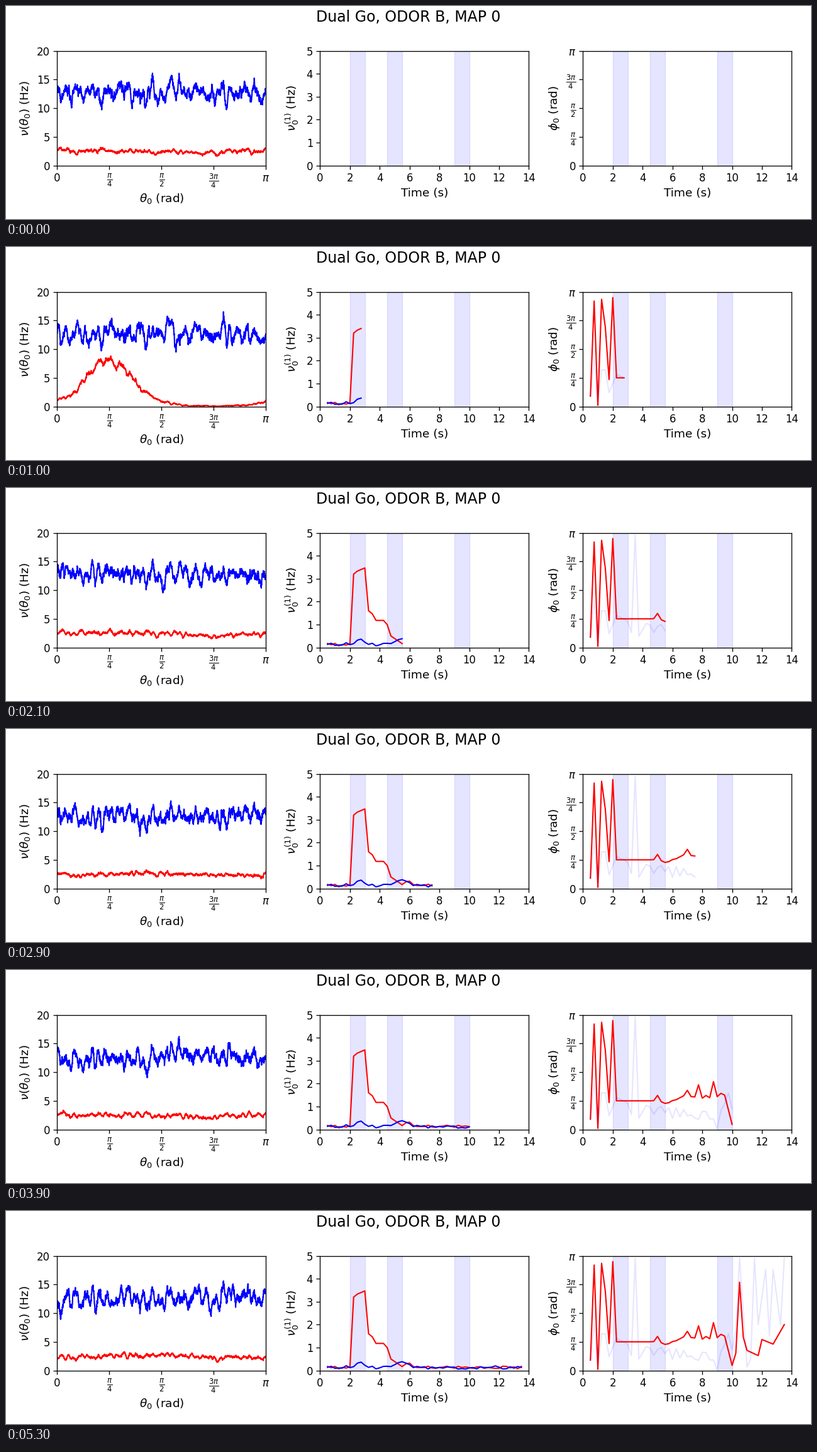
Recreate the animation shown at these times as a matplotlib script. Size 1280 by 340 pixels, loop 5400 ms.

```python
import numpy as np
import matplotlib.pyplot as plt
from matplotlib.animation import FuncAnimation

W, H, DPI = 1280, 340, 100
FRAMES, INTERVAL = 54, 100
TITLE, LABEL, TICK = 17.0, 13.3, 11.9
LINE = 1.5
RED_MEAN, BLUE_MEAN = 2.42, 12.6

plt.rcParams.update({
    "font.family": "DejaVu Sans",
    "axes.linewidth": 0.95,
    "xtick.labelsize": TICK, "ytick.labelsize": TICK,
    "xtick.major.size": 4.0, "ytick.major.size": 4.0,
    "xtick.major.width": 0.95, "ytick.major.width": 0.95,
    "xtick.major.pad": 4.1, "ytick.major.pad": 4.1,
})

t = 0.5 + 0.25 * np.arange(FRAMES - 1)
rng = np.random.default_rng(4)


def through(keys):
    """Straight segments through (time, value) key points."""
    return np.interp(t, *zip(*keys))


def jitter(scale):
    return scale * rng.uniform(-1, 1, t.size)


def swell(centre, width, height):
    return height * np.exp(-((t - centre) / width) ** 2)


# First Fourier moment: a noise floor plus the response to the cues
red_amp = through([(2, .12), (2.25, 3.2), (2.5, 3.33), (3, 3.47), (3.25, 1.6),
                   (3.5, 1.47), (3.75, 1.18), (4.25, 1.18), (4.5, 1),
                   (4.75, .5), (5.5, .17), (6, .3), (6.5, .13)])
red_amp += jitter(.06) * ((t < 2.25) | (t > 5.5))
blue_amp = (.13 + swell(2.75, .4, .17) + swell(5.5, .6, .25)
            + jitter(.08) * (1 - swell(5.2, .8, 1)))

# Phase as a fraction of pi: erratic, pinned by the cue, then drifting
drift = np.clip((t - 4.5) / 5, 0, 1)
delay = (t > 4.5) & (t < 9.5)
red_phase = through([(.5, .09), (.75, .92), (1, .01), (1.25, .935),
                     (1.5, .69), (1.75, .235), (2, .95), (2.25, .25),
                     (4.5, .25), (9.5, .30), (10, .044), (10.25, .15),
                     (10.5, .77), (10.75, .29), (11, .175), (11.75, .13),
                     (12, .27), (12.75, .23), (13.5, .40)])
red_phase += delay * (swell(5, .1, .045) + swell(7, .2, .06)
                      + swell(7.75, .1, .1) + swell(8.75, .1, .11)
                      - swell(5.6, .4, .035) + jitter(.02) * drift)
blue_phase = through([(.5, .09), (.75, .41), (1, .05), (1.25, .32),
                      (1.5, .32), (1.75, .12), (2.25, .28), (3, .23),
                      (3.25, .13), (3.5, .98), (3.75, .10), (4.25, .21),
                      (5.25, .15), (8.5, .13), (9, .03), (9.75, .32),
                      (10, .18), (10.25, .35), (10.5, .98), (11, .03),
                      (11.25, .10)])
blue_phase += delay * jitter(.05)
late = t >= 11.5
blue_phase[late] = .64 + .34 * np.cos(3 * np.pi * (t[late] - 11.5))

N = 2400
theta = np.linspace(0, np.pi, N)


def cell_noise(rng, scale, width=34):
    """White noise seen through a sliding mean."""
    white = rng.standard_normal(N + width - 1)
    return scale * np.convolve(white, np.ones(width), "valid") / np.sqrt(width)


# Part of the profile is fixed, the rest is redrawn at each step
red_fixed = cell_noise(rng, .16)
blue_fixed = cell_noise(rng, .75)


def tuned(amp, phase, mean):
    """Non-negative tuning curve with the given first moment."""
    r = amp / (2 * mean)
    k = r * (2 - r * r) / (1 - r * r)
    return mean * np.exp(k * np.cos(2 * (theta - np.pi * phase))) / np.i0(k)


def profiles(n):
    step_rng = np.random.default_rng(100 + n)
    i = min(n, t.size - 1)
    red = tuned(red_amp[i], red_phase[i], RED_MEAN)
    red += (red_fixed + cell_noise(step_rng, .2)) * np.sqrt(red / RED_MEAN)
    blue = tuned(blue_amp[i], blue_phase[i], BLUE_MEAN)
    blue += blue_fixed + cell_noise(step_rng, .75)
    return np.maximum(red, 0), blue


fig = plt.figure(figsize=(W / DPI, H / DPI), dpi=DPI, facecolor="white")


def panel(left, xlim, ylim):
    ax = fig.add_axes([left / W, 85.45 / H, 332 / W, 183 / H])
    ax.set_xlim(*xlim)
    ax.set_ylim(*ylim)
    return ax


def label(x, y, text, size=LABEL, rotation=0):
    fig.text(x / W, 1 - y / H, text, size=size, rotation=rotation,
             ha="center", va="baseline", rotation_mode="anchor")


pi_ticks = np.pi * np.arange(5) / 4
pi_names = ["0", r"$\frac{\pi}{4}$", r"$\frac{\pi}{2}$",
            r"$\frac{3\pi}{4}$", r"$\pi$"]

ax_rate = panel(81.4, (0, np.pi), (0, 20))
ax_amp = panel(499.4, (0, 14), (0, 5))
ax_phase = panel(917.4, (0, 14), (0, np.pi))

ax_rate.set_xticks(pi_ticks, pi_names)
ax_rate.set_yticks(range(0, 21, 5))
ax_amp.set_yticks(range(6))
ax_phase.set_yticks(pi_ticks, pi_names)
for ax in (ax_amp, ax_phase):
    ax.set_xticks(range(0, 15, 2))
    for start in (2, 4.5, 9):
        ax.axvspan(start, start + 1, color="b", alpha=0.1)

label(640, 24.5, "Dual Go, ODOR B, MAP 0", TITLE)
label(247.4, 313, r"$\theta_0$ (rad)")
label(665.4, 303.5, "Time (s)")
label(1083.4, 303.5, "Time (s)")
label(36, 163, r"$\nu(\theta_0)$ (Hz)", rotation=90)
label(462, 163, r"$\nu^{(1)}_0$ (Hz)", rotation=90)
label(877, 163, r"$\phi_0$ (rad)", rotation=90)


def line(ax, color, **style):
    return ax.plot([], [], color, lw=LINE, **style)[0]


red_rate, blue_rate = line(ax_rate, "r"), line(ax_rate, "b")
traces = [
    (line(ax_amp, "r"), red_amp),
    (line(ax_amp, "b"), blue_amp),
    (line(ax_phase, "r"), np.pi * red_phase),
    (line(ax_phase, "b", alpha=0.1), np.pi * blue_phase),
]


def update(n):
    red, blue = profiles(n)
    red_rate.set_data(theta, red)
    blue_rate.set_data(theta, blue)
    for trace, values in traces:
        trace.set_data(t[:n], values[:n])
    return [red_rate, blue_rate] + [trace for trace, _ in traces]


anim = FuncAnimation(fig, update, frames=FRAMES, interval=INTERVAL,
                     init_func=lambda: update(0), repeat=True, repeat_delay=0)
plt.show()
```
